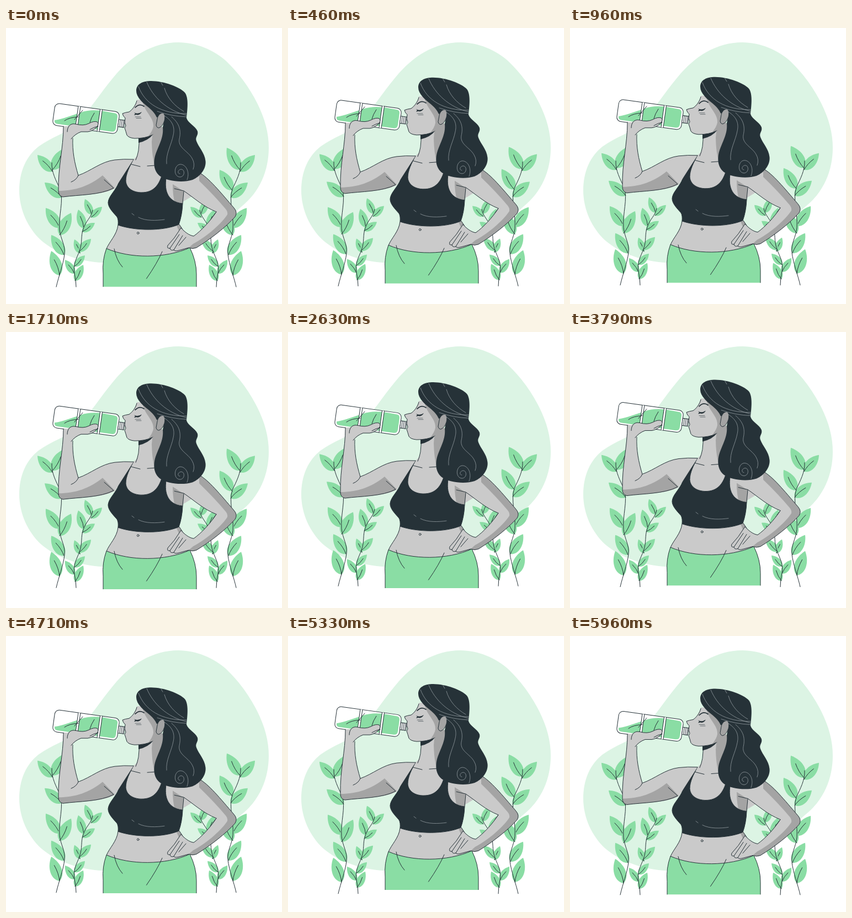
Recreate the animation shown at these times as an HTML page. Size 500 by 500 pixels, loop 6000 ms.

```html
<!DOCTYPE html>
<html lang="en">
<head>
<meta charset="utf-8">
<title>Drinking water</title>
<style>
  html, body { margin: 0; width: 100%; height: 100%; overflow: hidden; background: #fff; }
  svg { display: block; width: 100%; height: 100%; }
  .line { fill: none; stroke: #263238; stroke-width: 1; stroke-linecap: round; stroke-linejoin: round; }
  .skin { fill: #cacaca; }
  .shade { fill: #a4a4a4; }
  .dark { fill: #263238; }
  .green { fill: #8adda4; }
  .edge { stroke: #263238; stroke-width: 1; stroke-linejoin: round; }
  .strand { fill: none; stroke: #a3abaf; stroke-width: .7; stroke-linecap: round; }
</style>
</head>
<body>
<svg viewBox="0 0 500 500">
  <path fill="#dcf4e4" d="M312 26C344 26 377 40 399 60C422 82 441 108 455 136C469 164 476 190 476 217C476 258 460 297 426 324C397 350 372 371 340 387C290 413 235 426 175 425C138 424 93 410 64 385C39 362 24 328 24 294C24 261 36 232 60 214C82 198 108 191 126 175C153 148 171 117 195 89C226 51 266 26 312 26Z"/>
  <g id="plants"></g>

  <g id="woman">
    <!-- torso and neck -->
    <path class="skin" d="M242 190L241 218Q240 232 231 238L205 290L203 357C200 375 187 387 182 400C225 418 288 418 333 398Q327 373 314 356L320 315L345 300L356 266L290 200L270 180Z"/>
    <path class="shade" d="M266 186L264 206C265 235 267 258 289 275L300 200L282 178Z"/>
    <path class="shade" d="M302 283Q302 304 306 317L320 318L322 296Z"/>
    <path class="shade" d="M309 358L314 356Q322 367 327 380L316 374Z"/>
    <path class="line" d="M242 198L240 222Q238 233 235 239M203 357C201 375 187 387 182 400M314 356Q324 370 328 381M320 318L322 296"/>
    <path class="line" d="M214 244Q228 247 243 251M256 250L270 249"/>
    <circle class="line" cx="239.2" cy="371.5" r="1.8"/>

    <!-- leggings -->
    <path class="green" d="M182 399.500C225 418 288 418 333 398Q345 422 345 446V468.800H176V445Q174 421 182 399.500Z"/>
    <path class="line" stroke-linecap="butt" d="M176 468.500V445Q174 421 182 399.500C225 418 288 418 333 398Q345 422 345 446V468.500M196 400Q200 421 211 433M283 405Q274 426 254.500 454"/>

    <!-- arm on the hip -->
    <path class="skin" d="M300 270L350 262C367 271 388 297 413 326Q420 334 415 342C398 361 371 382 345 398Q338 401 331 398L313 403Q306 405 304 402Q298 404 297 399Q291 400 293 394L305 380L317 362C323 369 332 376 340 377C354 367 370 350 381 333C358 324 341 308 322 295Z"/>
    <path class="shade" d="M350 262C367 271 388 297 413 326Q420 334 415 342C398 361 371 382 345 398Q338 401 331 398L339 391C366 377 392 352 401 338Q402 333 398 328Q377 303 350 277Z"/>
    <path class="line" d="M350 262C367 271 388 297 413 326Q420 334 415 342C398 361 371 382 345 398Q338 401 331 398L313 403Q306 405 304 402Q298 404 297 399Q291 400 293 394L305 380L317 362C323 369 332 376 340 377C354 367 370 350 381 333C358 324 341 308 322 295L305 291M381 333L375 341M314 374L297 399M320 376L304 402M326 379L313 394"/>

    <!-- sports top -->
    <path class="dark edge" d="M222 240Q227 240 231 238C224 251 217 264 217 277C218 291 231 298 246 298C266 298 278 286 284 261L291 267C286 290 290 315 320 318Q319 340 313 356C285 368 235 368 203 357Q204 347 201 342C193 333 185 325 185 316C186 305 196 297 202 285Q213 259 222 240Z"/>
    <path class="strand" d="M228 336L232 339M240 343C253 350 273 349 287 347"/>

    <!-- bottle -->
    <g transform="translate(145 164) rotate(8)">
      <rect class="edge" fill="#fff" x="-59" y="-20" width="118" height="40" rx="8"/>
      <path class="green" d="M-56 11C-40 6 -25 -3 -10 -10Q3 -17 25 -18L49 -17Q56 -17 56 -11V10Q56 17 49 17H-50Q-56 17 -56 11Z"/>
      <path fill="#fff" d="M-17 -20h4v40h-4zM23 -20h4v40h-4z"/>
      <path class="line" d="M-17 -20v40M-13 -20v40M23 -20v40M27 -20v40"/>
      <path class="edge" fill="#fff" d="M59 -6.500H70V6.500H59Z"/>
      <path class="line" d="M62 -6.500v13M65 -6.500v13M68 -6.500v13"/>
    </g>
    <path class="line" d="M106 168Q114 162 131 161M124 166L139 149M152 171Q154 163 160 154"/>

    <!-- raised arm -->
    <path class="skin" d="M104 178L112 178Q118 173 126 174Q140 178 150 173Q159 168 165 170Q169 173 165 179Q157 187 148 188L136 188Q124 193 120 200C120 223 124 244 131 267C154 259 172 242 197 239Q213 237 231 238L197 291C174 303 133 302 103 306Q95 304 95 295C94 252 104 219 104 178Z"/>
    <path class="shade" d="M95 295C126 295 151 286 175 267L197 290C174 303 133 302 103 306Q95 304 95 295Z"/>
    <path class="line" d="M104 178C104 219 94 252 95 295Q95 304 103 306C133 302 170 303 195 290L178 275M118 201Q125 192 136 188L148 188Q157 187 165 179Q169 173 165 170Q159 168 150 173Q140 178 126 174C116 172 111 179 111 188M167 178Q158 180 152 184M121 200C120 223 124 244 131 267C154 259 172 242 197 239Q213 237 231 238M131 267Q128 275 118 279"/>

    <!-- head -->
    <path class="dark" d="M240 199L267 192Q258 204 240 208Z"/>
    <path class="skin" d="M237 130C235 140 229 148 223 152Q216 153 211 155Q212 160 216 163L215 171L217 177L215 181Q217 187 219 194Q222 199 233 200Q253 200 264 194L275 180L284 158L262 130Z"/>
    <path class="shade" d="M247 130C249 151 268 161 267 178Q266 186 257 197Q267 194 274 185L284 158L262 130Z"/>
    <path class="line" d="M237 132C235 140 229 148 223 152Q216 153 211 155Q212 160 216 163L215 171L217 177L215 181Q217 187 219 194Q222 199 233 200Q253 200 264 194"/>
    <path class="dark" d="M232 153Q238 157 246 152Q242 159 236 157L232 158L234 155Z"/>
    <path class="line" stroke-width="1.500" d="M234 144Q242 136 250 142" style="stroke-width:1.700"/>
    <path class="line" style="stroke-width:.600" d="M234 161L244 161M236 163.500L245 163.500"/>

    <!-- hair -->
    <path class="dark" d="M236 114C236 101 248 96 263 96C286 96 315 107 324 117C331 126 329 146 327 163C330 173 343 177 347 187C349 195 342 197 345 205C349 216 360 226 361.500 241C363 255 352 269 338 275C319 281 292 277 280 269C267 260 267 244 270 232C276 213 286 199 284 180L288 158L273 162C268 148 250 139 244 131Q236 122 236 114Z"/>
    <path class="shade edge" d="M274 165C275 157 282 152 286 155Q289 160 287 168Q284 178 277 181Q273 181 272 176Z"/>
    <path class="strand" d="M240 106C251 137 282 156 327 155M255 98C266 125 292 150 327 158M287 109C292 127 306 142 322 151M281 99L284 104M274 151Q300 160 327 161"/>
    <path class="strand" d="M287 159C303 169 306 181 303 194C300 211 289 228 291 246M300 161C316 174 317 188 314 201C311 217 330 223 337 236Q343 246 339 256"/>
    <path class="strand" d="M328 275C334 260 325 246 315 247C304 249 303 269 315 270C324 270 325 256 317 256C311 257 310 264 315 264"/>
  </g>
</svg>
<script>
const plants = document.getElementById('plants');
const woman = document.getElementById('woman');

// Each leaf: base x, base y, tip x, tip y
const tallLeaves = [
  [84, 260, 57, 230], [84, 257, 108, 217], [101, 307, 70, 280], [98, 294, 121, 257],
  [97, 362, 72, 326], [97, 375, 118, 335], [105, 411, 82, 375], [97, 448, 82, 404]
];
const shortLeaves = [
  [155, 338, 143, 310], [154, 343, 174, 324], [141, 363, 131, 329], [138, 369, 161, 353],
  [134, 408, 124, 383], [132, 405, 154, 382], [124, 445, 107, 420], [124, 432, 143, 412],
  [125, 458, 140, 429]
];
const tallStem = 'M83 244C82 261 91 277 98 292C105 314 95 338 97 365C99 383 108 394 106 410C104 428 95 451 91 469';
const shortStem = 'M157 330C155 343 144 350 140 364C135 377 139 388 133 404C128 418 121 427 124 444Q127 458 127 469';

function leaf([bx, by, tx, ty]) {
  const dx = tx - bx, dy = ty - by;
  const at = (along, side) => `${bx + dx * along - dy * side} ${by + dy * along + dx * side}`;
  const blade = `M${bx} ${by}C${at(.15, .3)} ${at(.62, .31)} ${tx} ${ty}C${at(.62, -.31)} ${at(.15, -.3)} ${bx} ${by}Z`;
  const vein = `M${bx} ${by}Q${at(.3, .07)} ${at(.64, 0)}`;
  return `<path class="green" d="${blade}"/><path class="line" d="${vein}"/>`;
}

const plant = (leaves, stem) => leaves.map(leaf).join('') + `<path class="line" d="${stem}"/>`;
const pair = plant(tallLeaves, tallStem) + plant(shortLeaves, shortStem);
plants.innerHTML = `<g>${pair}</g><g transform="translate(508 0) scale(-1 1)">${pair}</g>`;

// Linear rise and fall of 10 units
function lift(time, period) {
  const phase = time % period / period;
  return -10 * (1 - Math.abs(1 - 2 * phase));
}

function draw(time) {
  woman.setAttribute('transform', `translate(0 ${lift(time, 1500)})`);
  plants.setAttribute('transform', `translate(0 ${lift(time, 6000)})`);
}

const start = performance.now();
function tick() {
  draw(performance.now() - start);
  requestAnimationFrame(tick);
}
tick();
</script>
</body>
</html>
```
